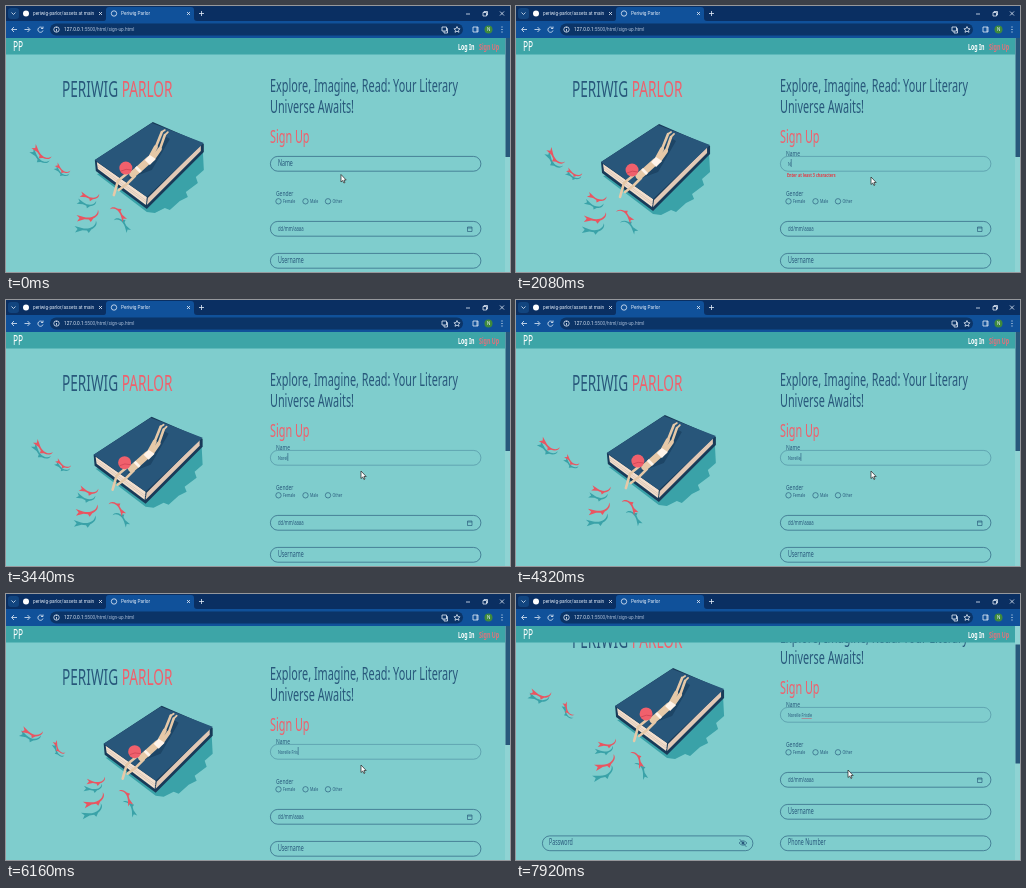
Recreate the animation shown at these times as an HTML page. Size 504 by 266 pixels, loop 8 s.

```html
<!DOCTYPE html>
<html lang="en">
<head>
<meta charset="utf-8">
<style>
html, body { margin: 0; width: 100%; height: 100%; overflow: hidden; }
svg { display: block; width: 504px; height: 266px; background: #7fcdcd; }
/* one ratio turns the installed face into a condensed one */
text {
  font-family: "Noto Sans", "Open Sans", sans-serif; fill: #28587b; white-space: pre;
  transform: scaleX(.62); transform-box: fill-box; transform-origin: left;
}
.ui text { font-family: Roboto, Arial, sans-serif; fill: #e4edf8; font-size: 4.7px; transform: none; }
.red { fill: #f0606c; }
.line { fill: none; stroke: #28587b; stroke-width: .65; }
.icon { fill: none; stroke: #e4edf8; stroke-width: .8; }
.skin { fill: none; stroke: #e6c9a8; stroke-linecap: round; stroke-linejoin: round; }
</style>
</head>
<body>
<svg viewBox="0 0 504 266">
  <defs>
    <path id="fish" d="M10-3C9 3 2 5-4 1L-10-3-8 1-11 4-4 3.500 0 5 1 8 4 5C8 4 11 1 10-3Z"/>
  </defs>

  <g id="page">
    <g font-size="22">
      <text x="56" y="91">PERIWIG <tspan class="red">PARLOR</tspan></text>
    </g>
    <g id="pond"></g>
    <g id="book">
      <path fill="#3aa2a8" d="M91 168 141 206 149 207 159 202 164 204 174 195 182 191 180 186 192 177 190 171 198 164 197 145Z"/>
      <path fill="#183a58" d="M89 154 90 165 141 203 198 146 198 138 147 116Z"/>
      <path fill="#f3dfcd" d="M91 156 92 163 140 199 141 191Z"/>
      <path fill="#e2c9b6" d="M142 192 141 199 195 145 195 139Z"/>
      <path fill="none" stroke="#c9b5a8" stroke-width=".5" d="M92 159 141 195M92 161 141 197"/>
      <path fill="#28567a" d="M146 117 198 137 141 191 89 154Z"/>
      <path fill="#1d4566" d="M122 173 146 164 153 152 164 133 159 130 144 149Z"/>
      <g class="skin">
        <path stroke-width="4" d="M144 152 150 141M147 153 154 143"/>
        <path stroke-width="2.600" d="M150 141 156 126M154 143 159 129"/>
        <path stroke-width="1.800" d="M156 126 159 124M159 129 162 126"/>
        <path stroke-width="7" d="M127 168 133 163 143 154"/>
        <path stroke-width="2.600" d="M123 166 112 175 108 189M129 170 121 178 113 184"/>
      </g>
      <path fill="#fff4ea" d="M139 154 144 149 150 153 144 159ZM129 162 131 160 136 165 134 167Z"/>
      <circle class="red" cx="120" cy="162" r="6.500"/>
      <path fill="none" stroke="#cf4555" stroke-width=".8" d="M115 165Q120 162 126 164"/>
    </g>

    <g font-size="17.500">
      <text x="264" y="86">Explore, Imagine, Read: Your Literary</text>
      <text x="264" y="107">Universe Awaits!</text>
      <text x="264" y="137" class="red">Sign Up</text>
    </g>
    <g id="fields"></g>
    <g font-size="8">
      <text id="label">Name</text>
      <text x="270" y="190">Gender</text>
      <text x="272" y="257" font-size="8.500">Username</text>
      <text x="272" y="288" font-size="8.500">Phone Number</text>
      <text x="33" y="288" font-size="8.500">Password</text>
    </g>
    <g id="radios" font-size="5.800"></g>
    <g font-size="6">
      <text x="272" y="225" font-size="6.800">dd/mm/aaaa</text>
      <text id="typed" x="272" y="160"></text>
      <text id="error" x="271" y="171" font-weight="600" style="fill:#e23b46">Enter at least 3 characters</text>
    </g>
    <path id="caret" fill="#28587b" d="M0 153h.6v8h-.6z"/>
    <path id="squiggle" fill="none" stroke="#d8485c" stroke-width=".5"/>
    <path class="line" d="M461.500 221h4.500v4.500h-4.500zM461.500 222h4.500"/>
    <path class="line" d="M223 286Q227 281.500 231 286 227 290.500 223 286M223.500 282 230.500 290"/>
    <circle cx="227" cy="286" r="1.500" fill="#28587b"/>
  </g>

  <rect y="32" width="499" height="16.500" fill="#3da5a7"/>
  <g font-size="8.600" font-weight="600">
    <text x="7" y="45" font-size="13.500" font-weight="400" style="fill:#fff">PP</text>
    <text x="452" y="44" style="fill:#fff">Log In</text>
    <text x="473" y="44" style="fill:#e3717b">Sign Up</text>
  </g>
  <rect x="499" y="32" width="5" height="234" fill="#8fd3d3"/>
  <rect id="thumb" x="499.500" width="4.500" height="119" fill="#28587b"/>

  <g class="ui">
    <rect width="504" height="16" fill="#0a2f62"/>
    <path fill="#10519a" d="M0 15H98Q100 15 100 12V4Q100 1 103 1H185Q188 1 188 4V12Q188 15 191 15H504V32H0Z"/>
    <rect x="44" y="17.500" width="413" height="12" rx="6" fill="#0b3467"/>
    <rect x="2" y="2" width="11" height="11" rx="3" fill="#12457f"/>
    <circle cx="20" cy="7.500" r="3" fill="#fff"/>
    <circle cx="108" cy="7.500" r="2.700" class="icon"/>
    <text x="27" y="9.300">periwig-parlor/assets at main</text>
    <text x="115" y="9.300">Periwig Parlor</text>
    <text x="58" y="25.200">127.0.0.1<tspan fill="#a9bdd8">:5500/html/sign-up.html</tspan></text>
    <path class="icon" d="M5.500 6.500 7.500 8.500 9.500 6.500M93 6 96 9M96 6 93 9M181 6 184 9M184 6 181 9M193 7.500H198M195.500 5V10
      M460 8H464M477 6.500H480.500V10H477ZM478 6.500V5.500H481.500V9H480.500M494 5.500 498 9.500M498 5.500 494 9.500
      M11 23.500H6M8 21 5.500 23.500 8 26M18.500 23.500H23.500M21.500 21 24 23.500 21.500 26M36.500 22A2.600 2.600 0 1 0 37 24.500M37 20.500V22.500H35
      M50.500 23V25.500M50.500 21V22M467 21H472V26H467ZM471 21V26
      M451 20.500 452 22.700 454 22.800 452.500 24.300 453 26.300 451 25.200 449 26.300 449.500 24.300 448 22.800 450 22.700Z
      M436 21H440.500V25H436ZM438 25V27H441.500V22.500H440.500"/>
    <circle class="icon" cx="50.500" cy="23.500" r="2.700"/>
    <circle cx="482.500" cy="23.500" r="4" fill="#3f8a3c"/>
    <text x="480.900" y="25.200">N</text>
    <path fill="#e4edf8" d="M495.500 20.500h1v1h-1zm0 2.500h1v1h-1zm0 2.500h1v1h-1z"/>
  </g>
  <path id="mouse" d="M0 0V7.500L1.700 6 2.900 8.500 4 8 2.900 5.500H5.200Z" fill="#fff" stroke="#222" stroke-width=".7"/>
</svg>

<script>
const $ = id => document.getElementById(id);
const move = (id, x, y) => $(id).setAttribute("transform", `translate(${x} ${y})`);
const show = (id, on) => $(id).setAttribute("visibility", on ? "visible" : "hidden");
const ease = (t, from, to) => {
  const p = Math.min(1, Math.max(0, (t - from) / (to - from)));
  return p * p * (3 - 2 * p);
};
const LOOP = 8000, CONDENSE = .62, NAME = "Norelle Fristle";
const KEYS = [1880, 2420, 2700, 2980, 3300, 3650, 3950, 4500, 5000, 5400, 5700, 6000, 6300, 6650, 7000];

// x, y, x drift, y drift, angle, turn, scale, shadow x, shadow y
const FISH = [
  [36, 146, -1.1, -1, 37, -2.6, 1, -2, 4],
  [57, 162, -.4, -1, 32, 2.7, .75, -1, 3],
  [84, 189, .7, -.35, 8, -1.7, .9, -3, 7],
  [82, 209, .7, -.4, -14, -1.4, 1.1, -2, 11],
  [112, 208, .85, -.5, 225, 1.5, .9, 4, 11]
];

$("fields").innerHTML = [[264, 150], [264, 215], [264, 247], [264, 278.5], [26, 278.5]].map(([x, y], i) =>
  `<rect class="line" ${i ? "" : 'id="name"'} x="${x + .4}" y="${y + .4}" width="210.5" height="14.8" rx="7.4"/>`).join("");
$("radios").innerHTML = [[272.5, "Female"], [299.5, "Male"], [322, "Other"]].map(([x, s]) =>
  `<circle class="line" cx="${x}" cy="195.3" r="2.7"/><text x="${x + 4.5}" y="197.3">${s}</text>`).join("");

function drawFish(d) {
  const put = (f, shadow) => {
    const [x, y, vx, vy, a, va, s, sx, sy] = f;
    const px = x + vx * d + shadow * sx, py = y + vy * d + shadow * sy;
    const color = shadow ? "#3aa2a8" : "#e95561";
    return `<use href="#fish" fill="${color}" transform="translate(${px} ${py}) rotate(${a + va * d}) scale(${s} ${s * .85})"/>`;
  };
  $("pond").innerHTML = FISH.map(f => put(f, 1)).join("") + FISH.map(f => put(f, 0)).join("");
}

function draw(t) {
  const drift = 3.2 - 7.2 * Math.cos(2 * Math.PI * (t - 1900) / 11000);
  move("book", drift, -drift / 2);
  drawFish(drift);

  const scroll = 37 * ease(t, 7600, 7900);
  move("page", 0, -scroll);
  $("thumb").setAttribute("y", 32 + scroll * .5);

  const go = ease(t, 80, 560), back = ease(t, 7320, 7680);
  move("mouse", 335 + 20 * go - 23 * back, 168.5 + 2.5 * go + 5 * back);

  const focused = t >= 620, lift = ease(t, 620, 840);
  $("label").setAttribute("x", 272 - 2 * lift);
  $("label").setAttribute("y", 160 - 10 * lift);
  $("label").setAttribute("font-size", 8.5 - .5 * lift);
  $("label").setAttribute("opacity", 1 - 1.6 * lift * (1 - lift));
  $("name").style.strokeWidth = focused ? .35 : .65;

  const count = KEYS.filter(k => k <= t).length;
  $("typed").textContent = NAME.slice(0, count);
  show("error", count > 0 && count < 3);

  const endOf = n => 272 + (n ? CONDENSE * $("typed").getSubStringLength(0, n) : 0);
  const blink = (t - 620) % 1060 < 530;
  const last = KEYS[count - 1] || 0;
  show("caret", focused && t < 7100 && (blink || t - last < 300));
  move("caret", endOf(count), 0);

  const done = t > 7700;
  show("squiggle", done);
  if (done) {
    const steps = Math.floor(endOf(15) - endOf(8));
    $("squiggle").setAttribute("d", `M${endOf(8)} 162` + "l.5-.6.5.6".repeat(steps));
  }
}

function tick(now) {
  draw(now % LOOP);
  requestAnimationFrame(tick);
}
draw(0);
requestAnimationFrame(tick);
</script>
</body>
</html>
```
